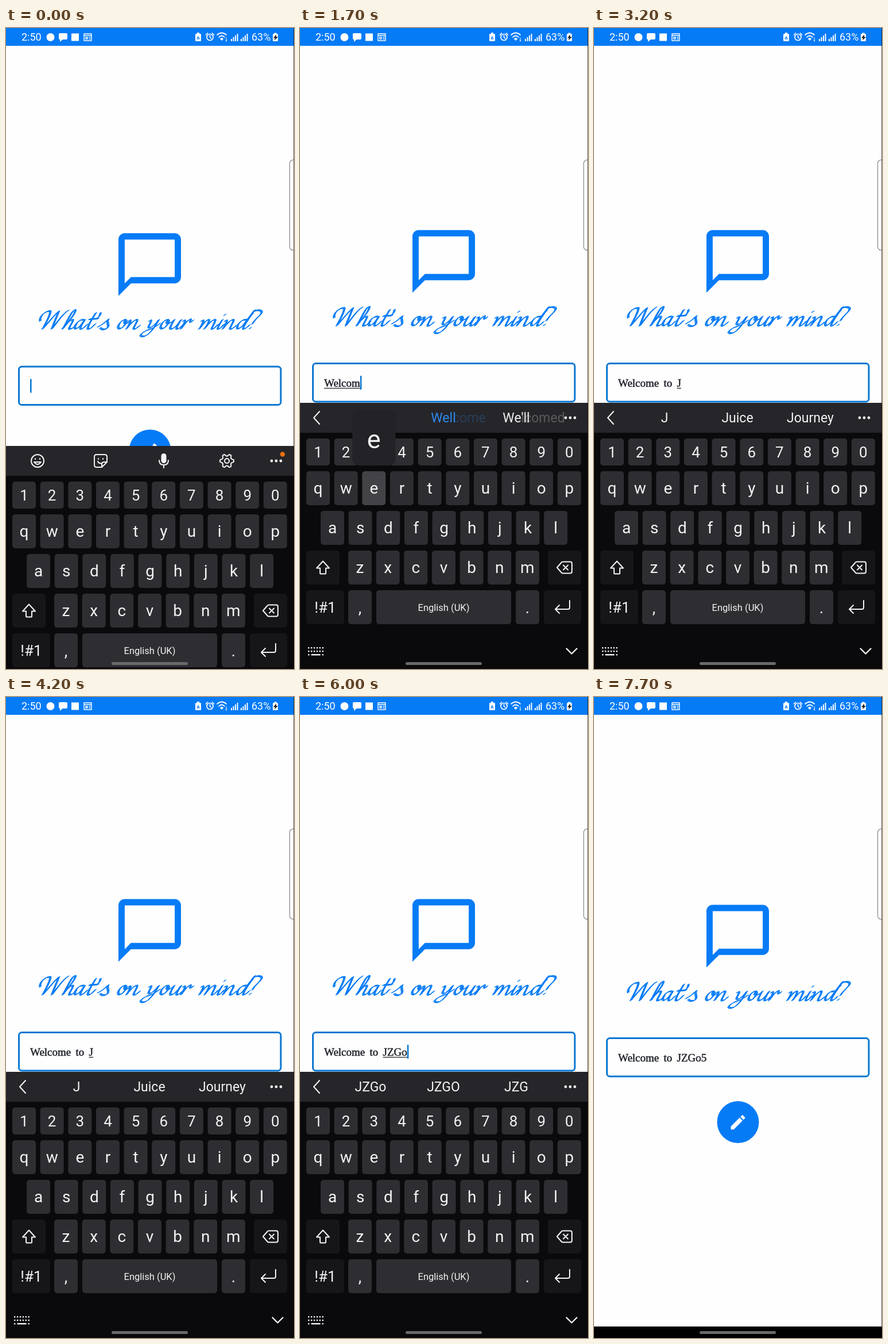
An HTML page with a canvas that plays this animation: 502 px wide and 1115 px high, repeating every 8 s.

```html
<!DOCTYPE html>
<html lang="en">
<head>
<meta charset="utf-8">
<title>Typing a note</title>
<style>
  html, body { margin: 0; width: 100%; height: 100%; overflow: hidden; background: #fefefe; }
  canvas { display: block; width: 502px; height: 1115px; }
</style>
</head>
<body>
<canvas id="stage" width="502" height="1115" aria-label="What's on your mind?"></canvas>
<script>
const ctx = document.getElementById('stage').getContext('2d');
const LOOP = 8000, STEP = 100;
const BLUE = '#067bf6', WHITE = '#f3f3f4', INK = '#20232b';
const UI = 'Roboto, sans-serif';
const BODY = '19px "Liberation Serif", serif';

// [time, value] tracks; each value holds until the next time
const textTrack = [[0, ''], [1000, 'W'], [1100, 'We'], [1200, 'Wel'], [1400, 'Welc'], [1500, 'Welco'],
  [1600, 'Welcom'], [1800, 'Welcome'], [2000, 'Welcome '], [2100, 'Welcome t'], [2200, 'Welcome to'],
  [2400, 'Welcome to '], [2700, 'Welcome to J'], [4800, 'Welcome to JZ'], [5000, 'Welcome to JZG'],
  [5700, 'Welcome to JZGo'], [6200, 'Welcome to JZGo5']];
const pressTrack = [[0, ''], [700, 'w'], [1000, 'e'], [1100, 'l'], [1300, 'c'], [1400, 'o'], [1500, 'm'],
  [1600, 'e'], [1800, ''], [1900, 'space'], [2000, 't'], [2100, 'o'], [2200, ''], [2300, 'space'],
  [2400, ''], [2500, 'shift'], [2600, 'j'], [2800, ''], [4600, 'shift'], [4700, 'z'], [4900, 'g'],
  [5200, ''], [5500, 'o'], [5800, ''], [6100, '5'], [6300, '']];
const upperTrack = [[0, false], [100, true], [1000, false], [2500, true], [2900, false], [4600, true], [5300, false]];
const shiftTrack = [[0, false], [100, true], [1000, false], [2500, true], [2800, false], [4600, true], [4900, false]];
const caretTrack = [[0, true], [600, false], [700, true], [3200, false], [3700, true], [4200, false],
  [4700, true], [5500, false], [5700, true], [6700, false], [7200, true], [7700, false]];
const hintTrack = [[0, null], [1100, ['We', 'Were', 'We are']], [1300, ['Wel', 'Well', "We'll"]],
  [1650, ['Welc', 'Welcome', 'Welcomed']], [2050, ['to', 'the', 'today']], [2400, ['the', 'my', 'our']],
  [2800, ['J', 'Juice', 'Journey']], [4920, ['JZ', 'JZG', 'Journal']], [5150, ['JZG', 'JZGs', 'JZ']],
  [5800, ['JZGo', 'JZGO', 'JZG']], [6350, ['JZGo5', 'JZGO5', 'JZGO4']]];
const keyboardTrack = [[0, 75], [100, 12], [200, 0], [7200, 60], [7300, 290], [7400, 470]];
const contentTrack = [[0, -4.5], [100, -9], [200, -10], [7300, -4], [7400, 0]];

const indexAt = (track, t) => {
  let i = 0;
  while (i + 1 < track.length && track[i + 1][0] <= t) i++;
  return i;
};
const at = (track, t) => track[indexAt(track, t)][1];

// Pen strokes of the script heading, baseline at y = 0
const script = {
  W: 'M2-14C-2-20 6-32 16-31C18-26 12-9 9 0C16-10 25-25 31-31C29-20 26-9 25 0C32-12 40-28 47-32',
  h: 'M1-2C8-11 19-29 16-33C11-34 7-16 1 0C6-10 12-17 15-16C18-14 9 0 13 0C17 0 20-3 23-7',
  a: 'M14-16C6-18-1-6 2-1C6 2 13-8 16-16C13-8 9 0 13 0C16 0 19-4 22-8',
  t: 'M11-28C7-18 0-3 3 0C7 1 11-5 14-9M2-17L17-18',
  "'": 'M2-28C3-24 1-21-1-19',
  s: 'M0-4C8-8 12-14 15-17C12-12 20-6 16-1C12 2 6 1 4-2',
  o: 'M12-16C5-17-1-5 3-1C8 2 15-8 14-14C12-17 9-12 12-10C15-9 17-10 19-12',
  n: 'M1-14C5-17 6-14 0 0C5-9 11-17 15-16C18-14 10-1 13 0C16 1 19-3 22-6',
  y: 'M1-14C5-17 5-14 2-6C1-1 5-1 9-5C13-9 16-13 17-16C14-6 6 12-4 13C-15 13-6 4 4 1C12-2 16-6 20-9',
  u: 'M4-16C2-10-3 0 2 0C7 0 13-9 16-16C13-9 9 0 12 0C16 0 18-4 21-7',
  r: 'M1-14C5-17 6-14 0 0C5-9 8-15 13-17C15-16 12-13 14-12C16-12 17-13 18-15',
  m: 'M1-14C5-17 6-14 0 0C5-9 10-17 13-16C16-15 12-6 9 0C14-9 20-17 24-16C27-14 20-1 22 0C25 1 28-4 31-8',
  i: 'M7-16C4-9 0 0 3 0C6 0 9-4 11-8M9-24L10-25',
  d: 'M14-16C6-18-1-6 2-1C6 2 13-8 16-16C20-22 24-30 26-33C21-22 9-1 13 0C16 0 20-4 22-7',
  '?': 'M2-25C0-31 11-35 17-31C21-26 9-19 6-9M3-1L4-2'
};
const heading = [['W', 55], ['h', 98], ['a', 118], ['t', 140], ["'", 157], ['s', 160], ['o', 193], ['n', 210],
  ['y', 246], ['o', 267], ['u', 286], ['r', 305], ['m', 337], ['i', 367], ['n', 378], ['d', 401], ['?', 422]]
  .map(([c, x]) => [new Path2D(script[c]), x]);

const bubble = new Path2D('M20 2H4c-1.1 0-2 .9-2 2v18l4-4h14c1.1 0 2-.9 2-2V4c0-1.1-.9-2-2-2zm0 14H6l-2 2V4h16v12z');
const pencil = new Path2D('M3 17.25V21h3.75L17.81 9.94l-3.75-3.75L3 17.25zM20.71 7.04c.39-.39.39-1.02 0-1.41l-2.34-2.34c-.39-.39-1.02-.39-1.41 0l-1.83 1.83 3.75 3.75 1.83-1.83z');
const shiftIcon = new Path2D('M0-11L11 1H5V10Q5 11 4 11H-4Q-5 11-5 10V1H-11Z');
const backspaceIcon = new Path2D('M-13 0L-6-8Q-5-10-3-10H10Q13-10 13-7V7Q13 10 10 10H-3Q-5 10-6 8ZM-2-4L6 4M6-4L-2 4');
const enterIcon = new Path2D('M13-11V1Q13 4 10 4H-12M-5-3L-12 4L-5 11');
const stickerIcon = new Path2D('M-7-11H7Q11-11 11-7V2L2 11H-7Q-11 11-11 7V-7Q-11-11-7-11ZM11 2H6Q2 2 2 6V11M-5 1Q-3 5 1 4M-4-4V-3M4-4V-3');
const smileIcon = new Path2D('M11 0A11 11 0 1 1-11 0A11 11 0 1 1 11 0M-6 2Q0 10 6 2ZM-4-4V-3M4-4V-3');
const micIcon = new Path2D('M-8-1Q-8 7 0 7Q8 7 8-1M0 7V12');

function rect(x, y, w, h, r, fill) {
  ctx.beginPath();
  ctx.roundRect(x, y, w, h, r);
  ctx.fillStyle = fill;
  ctx.fill();
}
function dot(x, y, r, fill) {
  ctx.beginPath();
  ctx.arc(x, y, r, 0, Math.PI * 2);
  ctx.fillStyle = fill;
  ctx.fill();
}
function label(text, x, y, size, color = WHITE, align = 'center') {
  ctx.font = `${size}px ${UI}`;
  ctx.textAlign = align;
  ctx.fillStyle = color;
  ctx.fillText(text, x, y);
}
function fillIcon(path, x, y, scale, color) {
  ctx.save();
  ctx.translate(x, y);
  ctx.scale(scale, scale);
  ctx.fillStyle = color;
  ctx.fill(path);
  ctx.restore();
}
function line(path, x, y, color = WHITE, width = 2) {
  ctx.save();
  ctx.translate(x, y);
  ctx.strokeStyle = color;
  ctx.lineWidth = width;
  ctx.lineCap = ctx.lineJoin = 'round';
  ctx.stroke(typeof path === 'string' ? new Path2D(path) : path);
  ctx.restore();
}

function drawStatusBar() {
  rect(0, 0, 502, 31, 0, BLUE);
  label('2:50', 27, 22, 18, '#fff', 'left');
  dot(77.5, 16, 7, '#fff');
  rect(92, 9, 15, 11, 2, '#fff');
  fillIcon(new Path2D('M94 18V24L100 19Z'), 0, 0, 1, '#fff');
  rect(114, 9.5, 13, 13, 0, '#fff');
  line('M0 0H13V12H0ZM0 3H13M3 6H6V9H3ZM9 6H11M9 9H11', 136, 10, '#fff', 1.4);

  rect(330, 10, 10, 13, 1.5, '#fff');
  rect(333, 8, 4, 3, 0, '#fff');
  line('M-2 2L0-2L2 2Z', 335, 17, BLUE, 1.2);
  line('M5.5 0A5.5 5.5 0 1 1-5.5 0A5.5 5.5 0 1 1 5.5 0M0-3V0L2 2M-7-4L-4-7M7-4L4-7', 355.5, 16, '#fff', 1.7);
  line('M-8-4Q0-11 8-4M-5 0Q0-5 5 0M-2 3Q0 1 2 3L0 5Z', 376, 16, '#fff', 1.7);
  line('M0-3V3M-1 2L0 3L1 2', 384, 20, '#fff', 1);
  for (const x of [392, 409])
    for (let i = 0; i < 4; i++) rect(x + i * 3.5, 19 - i * 3, 2, 4 + i * 3, 0, '#fff');
  label('63%', 428, 22, 18, '#fff', 'left');
  rect(465, 10, 9, 13, 1.5, '#fff');
  rect(467.5, 8.5, 4, 3, 0, '#fff');
  fillIcon(new Path2D('M1-5L-4 1H-1L-2 5L4-1H1Z'), 470, 16.5, 1, '#222');
}

// A broad slanted nib: hairline upstrokes, heavy downstrokes
function drawHeading() {
  for (const [path, x] of heading) {
    ctx.save();
    ctx.translate(x, 528);
    ctx.transform(1, 0, -0.2, 1, 0, 0);
    for (let k = -1.6; k <= 1.61; k += 0.4) line(path, k, -k * 0.65, BLUE, 0.8);
    ctx.restore();
  }
}

function drawInput(t) {
  ctx.beginPath();
  ctx.roundRect(22.5, 593.5, 456.5, 66.5, 5);
  ctx.strokeStyle = '#0b78d2';
  ctx.lineWidth = 3;
  ctx.stroke();

  const text = at(textTrack, t);
  ctx.font = BODY;
  ctx.textAlign = 'left';
  ctx.wordSpacing = '3.5px';
  ctx.fillStyle = ctx.strokeStyle = INK;
  ctx.lineWidth = 0.5;
  ctx.fillText(text, 42, 634);
  ctx.strokeText(text, 42, 634);
  const end = 42 + ctx.measureText(text).width;
  const wordStart = 42 + ctx.measureText(text.slice(0, text.lastIndexOf(' ') + 1)).width;
  ctx.wordSpacing = '0px';
  if (t < 7200 && end > wordStart) rect(wordStart, 636, end - wordStart, 1.3, 0, INK);
  if (at(caretTrack, t)) rect(end, 615, 2.6, 24, 0, '#0b78d2');
}

function drawPage(t) {
  rect(0, 0, 502, 1115, 0, '#fefefe');
  ctx.save();
  ctx.translate(0, at(contentTrack, t));
  fillIcon(bubble, 185.1, 350.6, 5.45, BLUE);
  drawHeading();
  drawInput(t);
  dot(251, 739.5, 36.5, BLUE);
  fillIcon(pencil, 234.4, 723.2, 1.38, '#fff');
  ctx.restore();
  ctx.beginPath();
  ctx.roundRect(494.5, 229.5, 20, 157, 6);
  ctx.strokeStyle = '#85858a';
  ctx.lineWidth = 1.2;
  ctx.stroke();
  if (isLeaving(t)) line('M4-16L-4 0L4 16', 475, 487, '#b9b9bc', 2.4);
}

const isLeaving = t => t >= 7000 && t < 7200;

function drawGear(x, y) {
  ctx.beginPath();
  for (let i = 0; i <= 48; i++) {
    const a = i / 48 * Math.PI * 2;
    const r = 10.3 + 1.7 * Math.tanh(3 * Math.cos(6 * a + Math.PI));
    ctx.lineTo(x + r * Math.cos(a + Math.PI / 6), y + r * Math.sin(a + Math.PI / 6));
  }
  ctx.closePath();
  ctx.moveTo(x + 4, y);
  ctx.arc(x, y, 4, 0, Math.PI * 2);
  ctx.strokeStyle = WHITE;
  ctx.lineWidth = 2;
  ctx.stroke();
}

// Words sit centred in three columns; "anchors" sets whose left edges they share
function drawHints(words, anchors, alpha, highlight) {
  ctx.globalAlpha = alpha;
  ctx.font = `23px ${UI}`;
  words.forEach((word, i) => {
    const left = 123 + i * 127 - ctx.measureText(anchors[i]).width / 2;
    label(word, left, 686, 23, highlight && i === 1 ? '#2d8bf2' : WHITE, 'left');
  });
  ctx.globalAlpha = 1;
}

function drawToolbar(t) {
  rect(0, 652, 502, 52, 0, '#262529');
  const i = indexAt(hintTrack, t), [start, words] = hintTrack[i];
  const dots = isLeaving(t) ? '#68676b' : WHITE;
  for (const x of [463, 471, 479]) dot(x, 678, 2.4, dots);
  if (!words) {
    line(smileIcon, 55, 678);
    line(stickerIcon, 165, 678);
    rect(270.5, 665, 9, 17, 4.5, WHITE);
    line(micIcon, 275, 678);
    drawGear(385, 678);
    dot(482, 666.5, 4.2, '#e8710f');
    return;
  }
  line('M5-11L-5 0L5 11', 29, 678);
  const previous = hintTrack[i - 1][1];
  const fade = previous ? Math.min(1, (t - start) / 200) : 1;
  if (fade < 1) drawHints(previous, previous, 1 - fade * fade, t < 2000);
  drawHints(words, fade < 1 ? previous : words, fade, t < 2000);
}

const rows = [['1234567890', 11, 714, 47], ['qwertyuiop', 11, 771, 59], ['asdfghjkl', 36, 840, 59], ['zxcvbnm', 84, 909, 59]];
const PITCH = 48.65, KEY_W = 41;
const keys = rows.flatMap(([chars, x, y, h]) => [...chars].map((char, i) => ({ char, x: x + i * PITCH, y, h })));

function drawKeys(t) {
  const pressed = at(pressTrack, t), upper = at(upperTrack, t);
  const face = (name, base) => pressed === name ? '#434246' : base;
  const LIGHT = '#2e2d31', DARK = '#161518';
  for (const { char, x, y, h } of keys) {
    rect(x, y, KEY_W, h, 5, face(char, LIGHT));
    const digit = h < 50;
    const name = upper ? char.toUpperCase() : char;
    label(name, x + KEY_W / 2, y + h / 2 + (digit || !upper ? 9 : 10), digit ? 26 : 28);
  }
  rect(11, 909, 58, 59, 5, face('shift', DARK));
  line(shiftIcon, 40, 938.5, at(shiftTrack, t) ? '#3b8ff2' : WHITE);
  rect(432, 909, 58, 59, 5, DARK);
  line(backspaceIcon, 461, 938.5);

  rect(11, 978, 66, 59, 5, DARK);
  label('!#1', 44, 1017, 26);
  rect(84, 978, KEY_W, 59, 5, LIGHT);
  label(',', 104.5, 1018, 28);
  rect(133, 978, 235, 59, 5, face('space', LIGHT));
  label('English (UK)', 250.5, 1014, 16.5);
  rect(376, 978, KEY_W, 59, 5, LIGHT);
  label('.', 396.5, 1018, 28);
  rect(425, 978, 65, 59, 5, DARK);
  line(enterIcon, 457, 1007);

  const key = keys.find(k => k.char === pressed);
  if (key) {
    const cx = key.x + KEY_W / 2;
    rect(cx - 37.5, key.y - 107, 75, 97, 11, '#232226');
    label(upper ? key.char.toUpperCase() : key.char, cx, key.y - 40, 45);
  }
}

function drawKeyboardIcon() {
  for (let c = 0; c < 6; c++)
    for (const y of [1077, 1083]) rect(14 + c * 4.9, y, 2.4, 2.4, 0, WHITE);
  for (const [x, w] of [[14, 2.4], [19.5, 16], [38.5, 2.4]]) rect(x, 1089, w, 2.4, 0, WHITE);
}

function drawKeyboard(t) {
  ctx.save();
  ctx.translate(0, at(keyboardTrack, t));
  rect(0, 652, 502, 540, 0, '#0a090b');
  drawToolbar(t);
  drawKeys(t);
  drawKeyboardIcon();
  line('M-9-5L0 4L9-5', 473.5, 1084.5, WHITE, 2.4);
  ctx.restore();
}

function draw(t) {
  drawPage(t);
  drawStatusBar();
  if (t >= 7200) rect(0, 1095, 502, 20, 0, '#000');
  if (t < 7400) drawKeyboard(t);
  rect(184, 1103, 133, 5, 2.5, '#69686b');
  rect(501, 0, 1, 1115, 0, 'rgba(0,0,0,.6)');
}

function tick() {
  const t = performance.now() % LOOP;
  draw(Math.floor(t / STEP) * STEP);
  requestAnimationFrame(tick);
}
tick();
</script>
</body>
</html>
```
